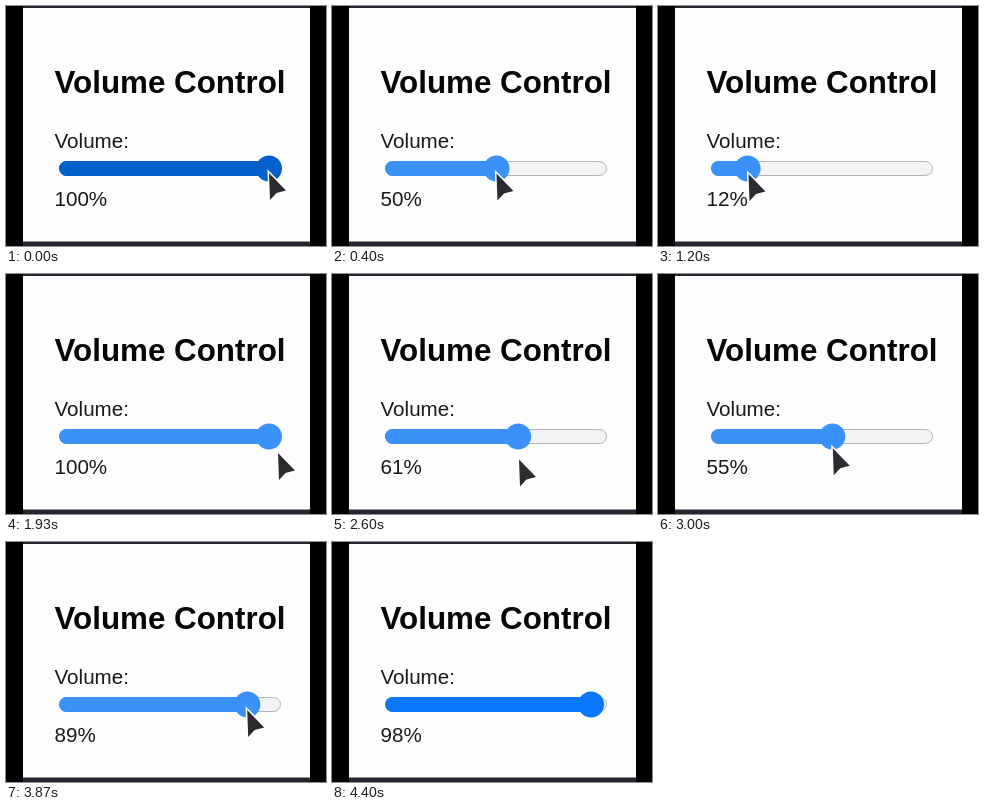
Write an HTML page that moves like this. It is 320x240 px and loops after 4470 ms.

```html
<!DOCTYPE html>
<html lang="en">
<head>
<meta charset="utf-8">
<title>Volume Control</title>
<style>
html, body { margin: 0; width: 100%; height: 100%; overflow: hidden; background: #000; }
svg { display: block; width: 100vw; height: 100vh; }
text { font: 20.6px Arial, "Liberation Sans", sans-serif; fill: #1a1a1c; }
.title { font-size: 31.35px; font-weight: bold; fill: #060608; }
</style>
</head>
<body>
<svg viewBox="0 0 320 240">
  <clipPath id="panel"><rect x="17" y="2" width="287" height="233.5"/></clipPath>
  <clipPath id="groove"><rect x="53" y="155" width="222" height="15" rx="7.5"/></clipPath>
  <rect width="320" height="240"/>
  <rect x="17" width="287" height="240" fill="#29242f"/>
  <g clip-path="url(#panel)">
    <rect x="17" y="2" width="287" height="234" fill="#fdfdfd"/>
    <text class="title" x="48.5" y="87">Volume Control</text>
    <text x="48.5" y="141.5">Volume:</text>
    <rect id="track" x="53.5" y="155.5" width="221" height="14" rx="7"/>
    <rect id="fill" x="53" y="155" height="15" clip-path="url(#groove)"/>
    <circle id="thumb" cy="162.5" r="13"/>
    <text id="label" x="48.5" y="199.75"></text>
    <path id="cursor" d="M0 0L1 27L7.5 20L17 17.500Z" fill="#2b2b30" stroke="#fff" stroke-width="3" paint-order="stroke"/>
  </g>
</svg>
<script>
const LOOP = 4470, STEP = 200 / 3;
const RELEASE = 4000;
const [track, fill, thumb, label, cursor] =
  ['track', 'fill', 'thumb', 'label', 'cursor'].map(id => document.getElementById(id));

// Points the pointer eases between: time, x, y
const stops = [
  [130, 263, 167], [655, 74, 168], [1200, 90.5, 168], [1930, 272, 179], [2600, 187, 185.5],
  [3270, 168, 168], [3530, 168, 168], [RELEASE, 259, 168], [4330, 320, 250]
];
// accent, rail, rail outline
const looks = {
  idle: ['#0a78fb', '#efeff1', '#b4b4b8'],
  hover: ['#0660cb', '#e4e4e6', '#88888e'],
  drag: ['#3a92f8', '#f3f3f6', '#b4b4b8']
};

function pointer(t) {
  const next = stops.findIndex(s => s[0] > t);
  const i = next < 0 ? stops.length - 1 : Math.max(1, next);
  const [t0, x0, y0] = stops[i - 1], [t1, x1, y1] = stops[i];
  const p = Math.min(1, Math.max(0, (t - t0) / (t1 - t0)));
  const e = p * p * (3 - 2 * p);
  return [x0 + (x1 - x0) * e, y0 + (y1 - y0) * e];
}

function state(t) {
  if (t > RELEASE + STEP) return 'idle';
  return t < 130 || (t > 3200 && t < 3530) ? 'hover' : 'drag';
}

function set(node, attributes) {
  for (const name in attributes) node.setAttribute(name, attributes[name]);
}

function draw() {
  const t = Math.floor((performance.now() % LOOP + 4) / STEP) * STEP;
  const [dragX] = pointer(Math.min(t, RELEASE));
  const level = Math.min(100, Math.max(0, Math.round((dragX - 66) / 1.97)));
  const thumbX = 66 + 1.97 * level;
  const [accent, rail, outline] = looks[state(t)];
  set(track, { fill: rail, stroke: outline });
  set(fill, { fill: accent, width: level === 100 ? 222 : thumbX - 53 });
  set(thumb, { fill: accent, cx: thumbX });
  set(cursor, { transform: `translate(${pointer(t)})` });
  label.textContent = level + '%';
  requestAnimationFrame(draw);
}
draw();
</script>
</body>
</html>
```
